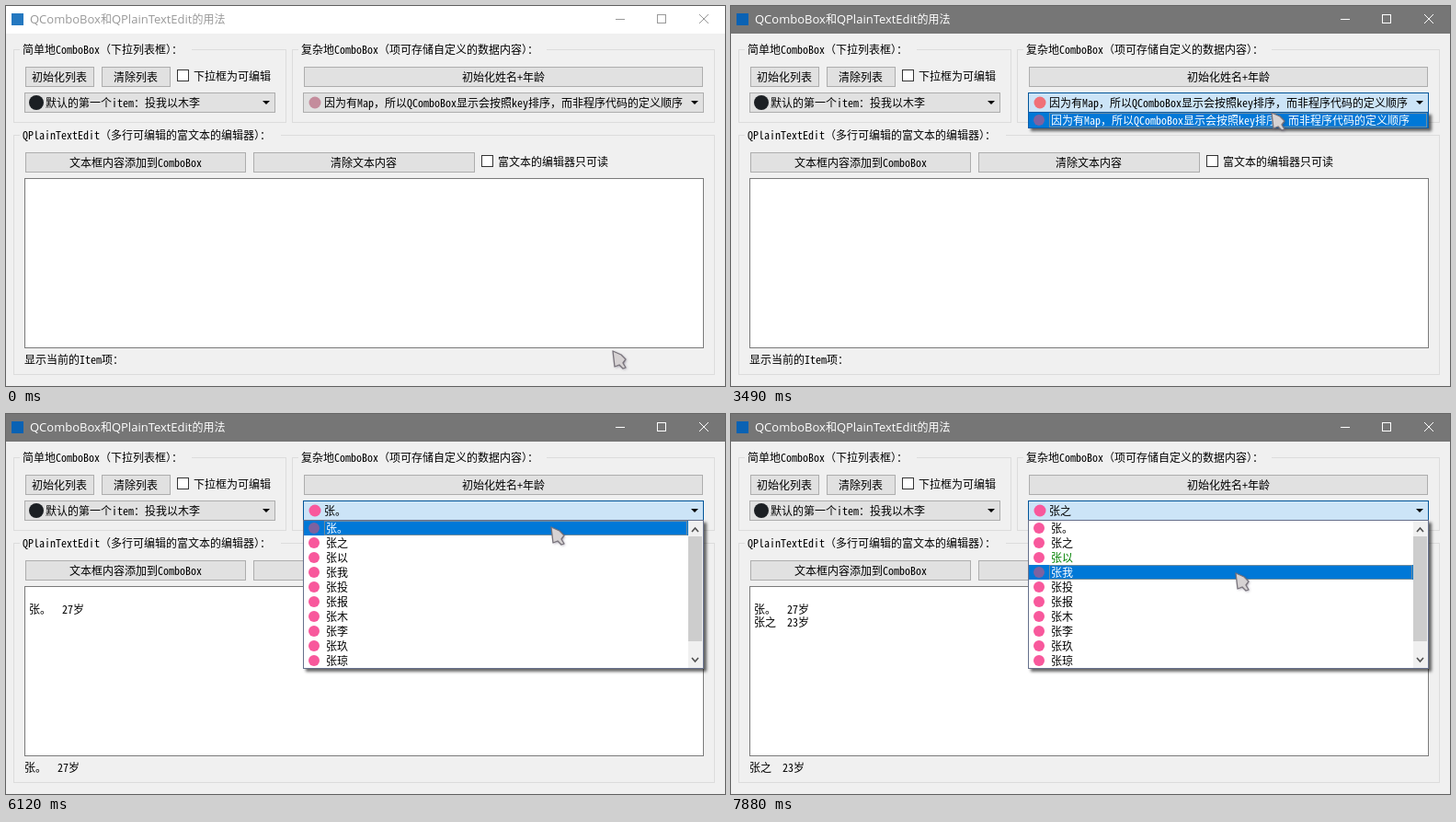
These frames come from a looping animation (782 px wide and 413 px high, 8 s). An HTML page with a canvas:

```html
<!DOCTYPE html>
<html lang="zh-CN">
<head>
<meta charset="utf-8">
<title>QComboBox</title>
<style>
html, body { margin: 0; width: 100%; height: 100%; overflow: hidden; background: #f0f0f0; }
canvas { display: block; }
</style>
</head>
<body>
<canvas id="stage" width="782" height="413"></canvas>
<script>
const ctx = document.getElementById('stage').getContext('2d');
const LOOP = 8000;
const CJK = '12px "Noto Sans CJK SC", "Noto Sans CJK JP", sans-serif';
const TITLE = '13px "Open Sans", "Noto Sans", sans-serif';
const MONO = '"Noto Sans Mono CJK SC", "Liberation Mono", monospace';

// Latin letters are half as wide as a 12px ideograph.
ctx.font = '12px ' + MONO;
const HALF = 12 * 6 / ctx.measureText('0').width + 'px ' + MONO;

// The screen refreshes only in bursts: [first, last, count].
const bursts = [
  [100, 870, 8], [970, 1410, 5], [1750, 2080, 4], [2300, 2510, 3], [3150, 3910, 8],
  [4060, 4810, 8], [4910, 5710, 8], [6020, 6800, 8], [6900, 7660, 8], [7780, 7880, 2]
];

// Pointer path: time, x, y.
const path = [
  [0, 659, 374], [210, 636, 330], [430, 560, 245], [650, 498, 172], [760, 504, 132], [870, 508, 103],
  [1640, 508, 103], [2080, 571, 137], [2200, 571, 137], [2510, 574, 142], [3040, 574, 142],
  [3476, 587, 115], [3910, 607, 79], [4060, 607, 79], [4480, 606, 86], [4910, 606, 86],
  [5367, 600, 104], [5600, 592, 108], [5710, 592, 122], [6132, 592, 122], [6466, 590, 138],
  [6800, 588, 118], [7117, 587, 109], [7335, 587, 109], [7552, 562, 142], [7660, 554, 158],
  [7780, 550, 167], [7880, 548, 172]
];

// Drop-downs: start of slide, fully open, closed, selected row.
const popups = [[1080, 1190, 4060, 0], [5480, 5590, 6460, 0], [7330, 7440, LOOP, 1]];

const HINT = '因为有Map，所以QComboBox显示会按照key排序，而非程序代码的定义顺序';
const names = [...'。之以我投报木李玖琼'].map(c => '张' + c);
const lines = ['张。  27岁', '张之  23岁'];

function lastRefresh(t) {
  let tick = 0;
  for (const [first, last, count] of bursts) {
    if (t < first) break;
    const step = (last - first) / (count - 1);
    tick = first + step * Math.min(count - 1, Math.floor((t - first + 12) / step));
  }
  return tick;
}

function pointerAt(t) {
  const i = path.findIndex(p => p[0] >= t);
  if (i < 0) return path.at(-1).slice(1);
  if (i === 0) return path[0].slice(1);
  const a = path[i - 1], b = path[i], k = (t - a[0]) / (b[0] - a[0]);
  return [1, 2].map(n => Math.round(a[n] + (b[n] - a[n]) * k));
}

function fill(x, y, w, h, color) {
  ctx.fillStyle = color;
  ctx.fillRect(x, y, w, h);
}

function box(x, y, w, h, color, border) {
  fill(x, y, w, h, border);
  fill(x + 1, y + 1, w - 2, h - 2, color);
}

function line(color, width, ...points) {
  ctx.strokeStyle = color;
  ctx.lineWidth = width;
  ctx.beginPath();
  for (const p of points) ctx.lineTo(...p);
  ctx.stroke();
}

function disc(x, y, r, color) {
  ctx.fillStyle = color;
  ctx.beginPath();
  ctx.arc(x, y, r, 0, 7);
  ctx.fill();
}

const runs = s => s.match(/[\x00-\xff]+|[^\x00-\xff]+/g);
const fontOf = (run, latin) => ctx.font = run.charCodeAt(0) < 256 ? latin : CJK;

function widthOf(s) {
  return runs(s).reduce((w, run) => (fontOf(run, HALF), w + ctx.measureText(run).width), 0);
}

function text(s, x, middle, color = '#000', latin = HALF) {
  ctx.fillStyle = color;
  for (const run of runs(s)) {
    fontOf(run, latin);
    ctx.fillText(run, x, middle + 5);
    x += ctx.measureText(run).width;
  }
}

function group(s, x, y, w, h, gap) {
  ctx.strokeStyle = '#dcdcdc';
  ctx.lineWidth = 1;
  ctx.strokeRect(x + .5, y + .5, w - 1, h - 1);
  fill(x + 7, y, gap, 1, '#f0f0f0');
  text(s, x + 10, y);
}

const looks = {
  normal: ['#e1e1e1', '#adadad'],
  hover: ['#e5f1fb', '#0078d7'],
  pressed: ['#cce4f7', '#005499']
};

function button(s, x, y, w, look = 'normal') {
  box(x, y, w, 22, ...looks[look]);
  text(s, Math.round(x + (w - widthOf(s)) / 2), y + 11);
}

function checkbox(s, x, y) {
  box(x, y, 13, 13, '#fff', '#333');
  text(s, x + 18, y + 7);
}

function combo(s, x, w, look, textX) {
  box(x, 94, w, 22, ...looks[look]);
  ctx.fillStyle = '#000';
  ctx.beginPath();
  ctx.moveTo(x + w - 14, 103);
  ctx.lineTo(x + w - 6, 103);
  ctx.lineTo(x + w - 10, 107);
  ctx.fill();
  text(s, textX, 105);
}

function titleBar(active) {
  const ink = active ? '#fff' : '#999';
  fill(0, 0, 782, 30, active ? '#767676' : '#fff');
  fill(6, 8, 13, 13, active ? '#0a62b4' : '#2478c0');
  text('QComboBox和QPlainTextEdit的用法', 26, 14, ink, TITLE);
  line(ink, 1, [663, 14.5], [673, 14.5]);
  ctx.strokeRect(708.5, 9.5, 9, 9);
  line(ink, 1, [754, 9], [764, 19]);
  line(ink, 1, [764, 9], [754, 19]);
}

function scrollBar(y) {
  fill(742, y, 16, 160, '#f0f0f0');
  fill(742, y + 17, 15, 114, '#cdcdcd');
  line('#505050', 1.6, [746, y + 12], [749.5, y + 8], [753, y + 12]);
  line('#505050', 1.6, [746, y + 149], [749.5, y + 153], [753, y + 149]);
}

function popup(items, row, shown, iconColor, seen) {
  const isList = items.length > 1;
  const height = items.length * 16 + 2;
  const visible = Math.round(height * shown);
  const top = 116 + visible - height;
  const rowWidth = isList ? 418 : 434;
  ctx.save();
  if (shown === 1) {
    ctx.shadowColor = 'rgba(0,0,0,.6)';
    ctx.shadowBlur = 3;
    ctx.shadowOffsetX = ctx.shadowOffsetY = 3;
  }
  fill(323, 115, 436, visible, isList ? '#66708c' : '#0a5ca8');
  ctx.restore();

  ctx.save();
  ctx.beginPath();
  ctx.rect(324, 116, 434, visible - 2);
  ctx.clip();
  fill(324, 116, 434, visible, '#fff');
  items.forEach((item, i) => {
    const y = top + i * 16, on = i === row;
    if (on) {
      fill(324, y, rowWidth, 16, '#0078d7');
      ctx.setLineDash([1, 1]);
      ctx.strokeStyle = '#e0a060';
      ctx.lineWidth = 1;
      ctx.strokeRect(346.5, y + .5, rowWidth - 24, 15);
      ctx.setLineDash([]);
    }
    disc(335, y + 8, 6, on ? '#7d62a0' : iconColor);
    text(item, 348, y + 8, on ? '#fff' : i === 2 && seen ? '#008000' : '#000');
  });
  if (isList) scrollBar(top);
  ctx.restore();
}

function pointer(x, y) {
  ctx.save();
  ctx.translate(x, y);
  ctx.shadowColor = 'rgba(60,50,80,.5)';
  ctx.shadowBlur = 3;
  ctx.shadowOffsetX = ctx.shadowOffsetY = 1;
  ctx.lineJoin = 'round';
  ctx.lineWidth = 1.3;
  ctx.strokeStyle = '#77727a';
  ctx.fillStyle = '#d6d2d3';
  const shape = new Path2D('M1 1 L10 5 L15 10 L12 14 L15 19 L12 20 L8 16 L3 18 Z');
  ctx.fill(shape);
  ctx.shadowColor = 'transparent';
  ctx.stroke(shape);
  ctx.restore();
}

function draw(t) {
  const [x, y] = pointerAt(t);
  const open = popups.find(p => t >= p[0] && t < p[2]);
  const sliding = open && t < open[1];
  const over = (left, top, w) => !open && x >= left && x < left + w && y >= top && y < top + 22;
  const hover = (...area) => over(...area) ? 'hover' : 'normal';
  const pick = t >= 6460 ? 1 : t >= 4910 ? 0 : -1;
  const pink = t < 970 ? '#c48c9c' : t < 4060 ? '#f07078' : '#f8589c';

  fill(0, 0, 782, 413, '#f0f0f0');
  titleBar(t >= 970);
  group('简单地ComboBox（下拉列表框）：', 8, 47, 297, 80, 187);
  group('复杂地ComboBox（项可存储自定义的数据内容）：', 311, 47, 460, 80, 270);
  group('QPlainTextEdit（多行可编辑的富文本的编辑器）：', 8, 140, 763, 261, 284);

  button('初始化列表', 21, 66, 75);
  button('清除列表', 104, 66, 75);
  checkbox('下拉框为可编辑', 186, 69);
  combo('默认的第一个item：投我以木李', 20, 273, 'normal', 43);
  disc(33, 105, 8, '#1b1f23');

  const pressing = t >= 4800 && t < 4910;
  button('初始化姓名+年龄', 324, 66, 434, pressing ? 'pressed' : hover(324, 66, 434));
  const comboLook = sliding ? 'hover' : open ? 'pressed' : hover(323, 94, 436);
  combo(pick < 0 ? HINT : names[pick], 323, 436, comboLook, 346);
  disc(336, 105, 6.5, pink);

  button('文本框内容添加到ComboBox', 21, 159, 240);
  button('清除文本内容', 269, 159, 241, hover(269, 159, 241));
  checkbox('富文本的编辑器只可读', 517, 162);
  box(20, 187, 739, 185, '#fff', '#7a7a7a');
  lines.slice(0, pick + 1).forEach((s, i) => text(s, 25, 212 + i * 14));
  text(pick < 0 ? '显示当前的Item项：' : lines[pick], 20, 384);

  if (open) {
    const row = y < 116 ? open[3] : Math.floor((y - 116) / 16);
    if (pick < 0) popup([HINT], 0, sliding ? .5 : 1, pink);
    else popup(names, row, sliding ? .37 : 1, pink, t >= 7780);
  }
  pointer(x, y);
}

function frame(now) {
  draw(lastRefresh(now % LOOP));
  requestAnimationFrame(frame);
}
requestAnimationFrame(frame);
</script>
</body>
</html>
```
